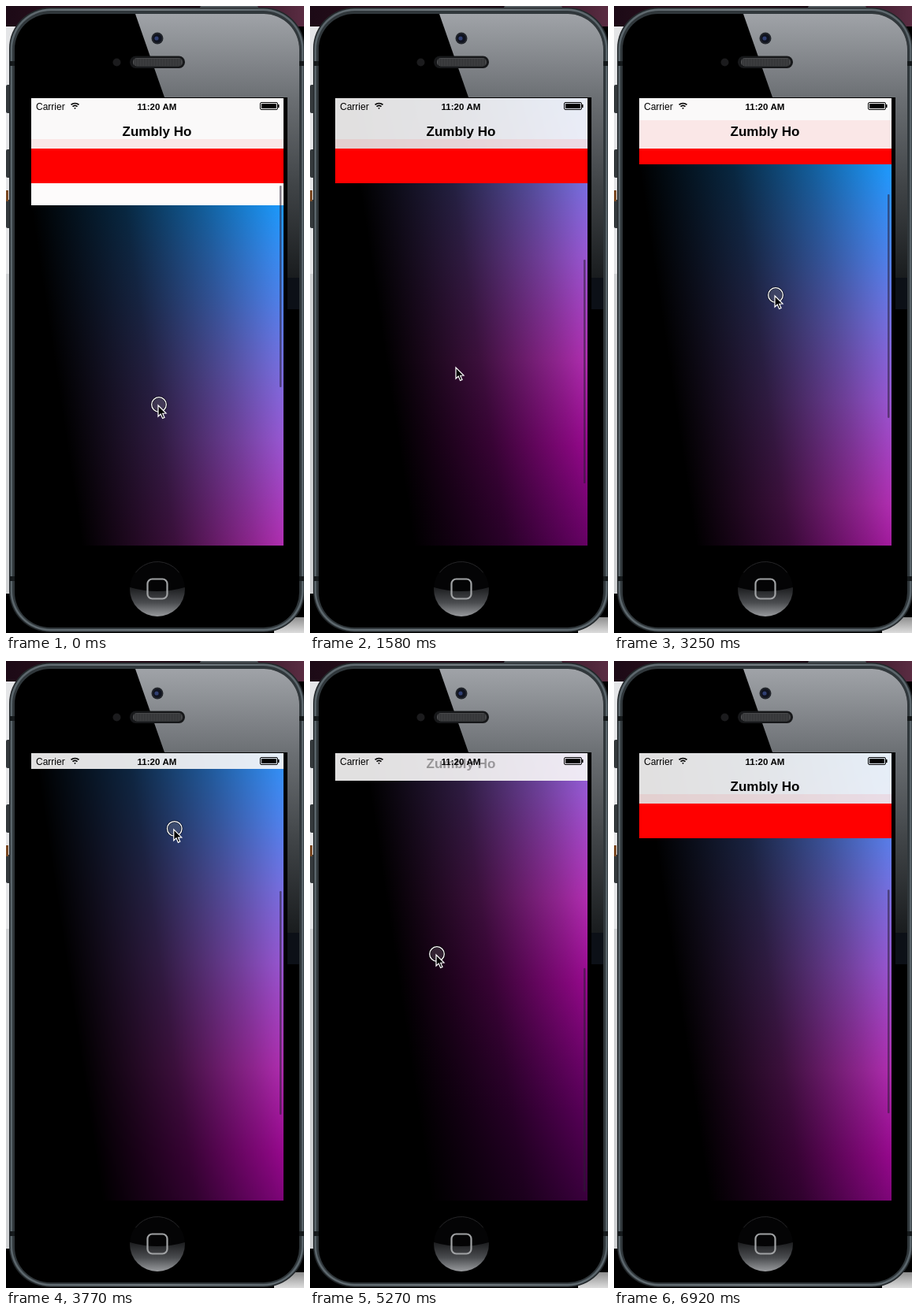
An HTML page with a canvas that plays this animation: 378 px wide and 796 px high, repeating every 7050 ms.

```html
<!DOCTYPE html>
<html lang="en">
<head>
<meta charset="utf-8">
<title>Collapsing navigation bar</title>
<style>
  html, body { margin: 0; width: 100%; height: 100%; overflow: hidden; background: #000; }
  canvas { display: block; }
</style>
</head>
<body>
<canvas id="stage" width="378" height="796"></canvas>
<script>
const ctx = document.getElementById('stage').getContext('2d');
const LOOP = 7050, STEP = 87.5, LAST = 79;
const FONT = '"Liberation Sans", Arial, sans-serif';
const BAR_MIN = 137, BAR_MAX = 225;

// step, image top, cursor x, cursor y, pressed
const KEYS = [
  [0, 253, 193, 507, 1],
  [7, 60, 187, 350, 0],
  [12, -70, 184, 350, 1],
  [17, 0, 185, 441, 0],
  [18, 18, 185, 459, 0],
  [23, 240, 192, 428, 0],
  [26, 227, 197, 411, 0],
  [29, 225, 201, 400, 1],
  [32, 260, 203, 470, 0],
  [36, 225, 204, 392, 1],
  [37, 201, 204, 368, 1],
  [50, -52, 223, 34, 1],
  [52, -72, 224, 25, 0],
  [58, -146, 160, 357, 1],
  [60, -131, 160, 373, 1],
  [65, -40, 165, 464, 0],
  [79, 88, 338, 830, 0]
];

// The bar follows the scroll within its limits; overscroll leaves it open.
function moveBar(bar, from, to) {
  const moved = bar + Math.min(to, BAR_MAX) - Math.min(from, BAR_MAX);
  return Math.max(BAR_MIN, Math.min(BAR_MAX, moved));
}

function poseAt(step) {
  let bar = BAR_MAX, i = 0;
  while (KEYS[i + 1] && KEYS[i + 1][0] <= step) bar = moveBar(bar, KEYS[i][1], KEYS[++i][1]);
  const a = KEYS[i], b = KEYS[i + 1] || a;
  const p = (step - a[0]) / (b[0] - a[0] || 1);
  const [, top, x, y] = a.map((v, n) => v + (b[n] - v) * p);
  return { top, x, y, bar: moveBar(bar, a[1], top), pressed: a[4] };
}

function gradient(c, x1, y0, y1, stops) {
  const g = c.createLinearGradient(0, y0, x1, y1);
  stops.forEach(([at, color]) => g.addColorStop(at, color));
  return g;
}

function rect(c, color, x, y, w, h) {
  c.fillStyle = color;
  c.fillRect(x, y, w, h);
}

function round(c, color, x, y, w, h, r) {
  c.fillStyle = color;
  c.beginPath();
  c.roundRect(x, y, w, h, r);
  c.fill();
}

function disc(c, color, x, y, r) {
  c.fillStyle = color;
  c.beginPath();
  c.arc(x, y, r, 0, 7);
  c.fill();
}

function text(str, x, y, font, align, color = '#000') {
  ctx.font = `${font} ${FONT}`;
  ctx.textAlign = align;
  ctx.fillStyle = color;
  ctx.fillText(str, x, y);
}

function layer(w, h, paint) {
  const canvas = document.createElement('canvas');
  canvas.width = w;
  canvas.height = h;
  paint(canvas.getContext('2d'));
  return canvas;
}

const picture = layer(320, 838, c => {
  rect(c, gradient(c, 0, 0, 838, [
    [0, '#1c9bff'], [.143, '#568cff'], [.247, '#897eff'], [.358, '#b969ff'],
    [.515, '#ec3dec'], [.644, '#dc0cce'], [.835, '#980098'], [1, '#64006a']
  ]), 0, 0, 320, 838);
  rect(c, gradient(c, 313, 0, -47, [
    [0, '#000f'], [.37, '#000000bf'], [.68, '#00000066'], [1, '#0000']
  ]), 0, 0, 320, 838);
});

const phone = layer(378, 796, c => {
  // desktop behind the phone
  rect(c, '#000', 0, 0, 378, 796);
  rect(c, gradient(c, 378, 0, 0, [[0, '#1c0a16'], [.3, '#30121f'], [.65, '#1a0913'], [1, '#5a2c42']]), 0, 0, 378, 26);
  rect(c, '#e4e5e7', 0, 26, 14, 314);
  rect(c, '#cfd1d3', 0, 340, 14, 406);
  rect(c, gradient(c, 0, 770, 796, [[0, '#777'], [1, '#ddd']]), 340, 776, 38, 20);
  for (const y of [100, 182, 246]) round(c, '#34393c', 0, y, 7, 36, 2);
  rect(c, '#7b4a24', 0, 234, 3, 14);
  round(c, '#555b60', 246, 0, 74, 6, 2);

  // metal rim
  round(c, '#23282b', 4, 2, 375, 793, 52);
  round(c, gradient(c, 378, 0, 0, [[0, '#59646a'], [.5, '#737b80'], [1, '#59646a']]), 5.5, 3.5, 372, 790, 51);
  round(c, '#30373b', 8, 6, 367, 785, 49);
  for (const y of [70, 724]) for (const x of [5, 372]) rect(c, '#15191b', x, y, 6, 6);

  // glass with reflection
  c.save();
  c.beginPath();
  c.roundRect(11, 10, 361, 779, 45);
  c.clip();
  rect(c, '#000', 11, 10, 361, 779);
  c.beginPath();
  c.moveTo(164, 10);
  c.lineTo(372, 10);
  c.lineTo(372, 345);
  c.lineTo(281, 345);
  c.fillStyle = gradient(c, 0, 10, 345, [[0, '#a0a3a8'], [.32, '#6b6f73'], [.65, '#404447'], [1, '#191c1e']]);
  c.fill();
  rect(c, '#000', 30, 116, 327, 571);
  rect(c, '#0c1017', 357, 345, 15, 40);
  c.restore();

  // camera, sensor and speaker
  disc(c, '#22252b', 192, 41, 7.5);
  disc(c, '#10131f', 192, 41, 5.5);
  disc(c, '#303f72', 191, 41, 2.6);
  disc(c, '#1b1b1d', 140.5, 71.5, 5);
  round(c, '#17181a', 157, 63.5, 70, 15.5, 7.5);
  round(c, '#494a4c', 161, 66, 63, 10.5, 5);
  for (let x = 163; x < 222; x += 2) rect(c, '#292a2c', x, 67, 1, 9);

  // home button
  c.save();
  c.beginPath();
  c.arc(192, 740, 35, 0, 7);
  c.clip();
  rect(c, '#040405', 157, 705, 70, 70);
  c.beginPath();
  c.moveTo(157, 738);
  c.quadraticCurveTo(192, 748, 227, 738);
  c.lineTo(227, 775);
  c.lineTo(157, 775);
  c.fillStyle = gradient(c, 0, 740, 775, [[0, '#202123'], [.5, '#4a4c4f'], [1, '#999b9e']]);
  c.fill();
  c.restore();
  c.strokeStyle = '#252527';
  c.beginPath();
  c.arc(192, 740, 34.5, -2.5, -.64);
  c.stroke();
  c.strokeStyle = '#a0a2a4';
  c.lineWidth = 2.2;
  c.beginPath();
  c.roundRect(179.5, 727.5, 25, 25, 6);
  c.stroke();
});

function drawStatus() {
  text('Carrier', 38, 132, '12px', 'left');
  text('11:20 AM', 191.5, 132, 'bold 11.5px', 'center');
  ctx.strokeStyle = '#000';
  ctx.lineWidth = 1.7;
  for (const r of [1, 4.5, 7.5]) {
    ctx.beginPath();
    ctx.arc(87.5, 131, r, -2.3, -.84);
    ctx.stroke();
  }
  ctx.lineWidth = 1;
  ctx.beginPath();
  ctx.roundRect(322.5, 122.5, 22, 9, 1.5);
  ctx.stroke();
  rect(ctx, '#000', 324, 124, 19, 6);
  rect(ctx, '#000', 345, 125, 1.5, 4);
}

function drawBars(bar) {
  const navBottom = Math.min(bar, 181);
  rect(ctx, 'rgba(250,249,249,.9)', 32, 117, 320, navBottom - 117);
  if (bar > 181) {
    const pinkTop = Math.max(bar - 56, BAR_MIN);
    rect(ctx, 'rgba(255,0,0,.07)', 32, pinkTop, 320, 181 - pinkTop);
    rect(ctx, '#f00', 32, 181, 320, bar - 181);
  }
  const shown = (navBottom - BAR_MIN) / 44;
  if (shown > 0) text('Zumbly Ho', 191.5, navBottom - 16, 'bold 17px', 'center', `rgba(0,0,0,${shown})`);
  drawStatus();
}

function drawScroller(top) {
  const over = Math.max(0, top - BAR_MAX);
  const y = 228 + Math.max(0, BAR_MAX - top) / 2.2;
  round(ctx, 'rgba(40,30,50,.55)', 347, y, 2.5, Math.min(284 - over, 682 - y), 1.2);
}

const arrow = new Path2D('M0 0V14L3.2 11 5.6 16.5 8 15.4 5.7 10.2 10 10Z');

function drawCursor({ x, y, pressed }) {
  ctx.save();
  ctx.translate(x, y);
  if (pressed) {
    disc(ctx, 'rgba(130,130,130,.25)', 1, -1, 9);
    for (const [color, width] of [['rgba(0,0,0,.6)', 2.8], ['#fff', 1.3]]) {
      ctx.strokeStyle = color;
      ctx.lineWidth = width;
      ctx.beginPath();
      ctx.arc(1, -1, 9.3, 0, 7);
      ctx.stroke();
    }
  }
  ctx.fillStyle = '#000';
  ctx.fill(arrow);
  ctx.strokeStyle = '#fff';
  ctx.lineWidth = 1.2;
  ctx.stroke(arrow);
  ctx.restore();
}

function render(now) {
  const pose = poseAt(Math.min(LAST, Math.floor((now % LOOP) / STEP)));
  ctx.drawImage(phone, 0, 0);
  ctx.save();
  ctx.beginPath();
  ctx.rect(32, 117, 320, 568);
  ctx.clip();
  rect(ctx, '#fdfbfb', 32, 117, 320, 568);
  ctx.drawImage(picture, 32, pose.top);
  drawScroller(pose.top);
  drawBars(pose.bar);
  ctx.restore();
  drawCursor(pose);
}

const start = performance.now();
function tick() {
  render(performance.now() - start);
  requestAnimationFrame(tick);
}
tick();
</script>
</body>
</html>
```
